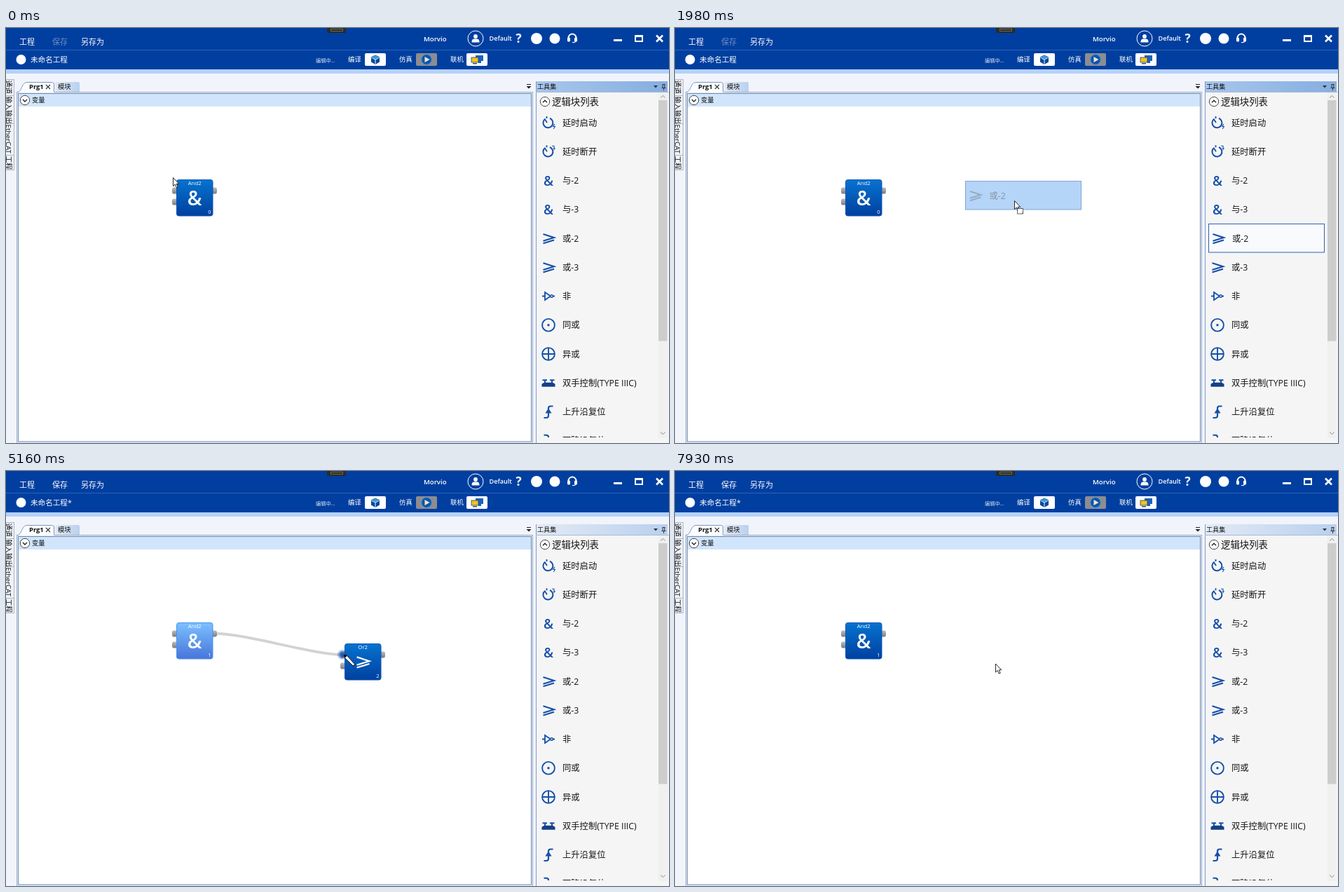
An HTML page that plays this animation: 946x592 px, repeating every 8000 ms.

```html
<!DOCTYPE html>
<html lang="zh-CN">
<head>
<meta charset="utf-8">
<title>逻辑编辑器</title>
<style>
html, body { margin: 0; width: 100%; height: 100%; overflow: hidden; background: #f1f4fa; }
svg { display: block; width: 946px; height: 592px; }
text { font-family: "Open Sans", "Noto Sans CJK SC", "Noto Sans CJK", sans-serif; white-space: pre; }
</style>
</head>
<body>
<svg id="stage" viewBox="0 0 946 592" xmlns="http://www.w3.org/2000/svg">
<defs>
  <linearGradient id="dark" x2="0" y2="1"><stop stop-color="#0673d0"/><stop offset="1" stop-color="#00409f"/></linearGradient>
  <linearGradient id="lit" x2="0" y2="1"><stop stop-color="#7cc0ff"/><stop offset="1" stop-color="#4775da"/></linearGradient>
  <linearGradient id="port" x2="0" y2="1"><stop stop-color="#b9bcc2"/><stop offset=".5" stop-color="#9a9da3"/><stop offset="1" stop-color="#777b83"/></linearGradient>
  <linearGradient id="active"><stop stop-color="#a8c6eb"/><stop offset="1" stop-color="#86aee0"/></linearGradient>
  <linearGradient id="idle"><stop stop-color="#e3eaf4"/><stop offset="1" stop-color="#b9d0ee"/></linearGradient>
  <radialGradient id="halo"><stop stop-color="#1450b4"/><stop offset=".5" stop-color="#1450b4" stop-opacity=".6"/><stop offset="1" stop-color="#1450b4" stop-opacity="0"/></radialGradient>
  <clipPath id="listClip"><rect x="757" y="92" width="174" height="492"/></clipPath>
</defs>
</svg>
<script>
const stage = document.getElementById('stage');
const BLUE = '#003fa0', INK = '#1650a8', LOOP = 8000;

const rect = (x, y, w, h, fill, more = '') =>
  `<rect x="${x}" y="${y}" width="${w}" height="${h}" fill="${fill}" ${more}/>`;
const disc = (x, y, r, fill, more = '') =>
  `<circle cx="${x}" cy="${y}" r="${r}" fill="${fill}" ${more}/>`;
const line = (d, color, w = 1, more = '') =>
  `<path d="${d}" fill="none" stroke="${color}" stroke-width="${w}" ${more}/>`;
const fill = (d, color, more = '') => `<path d="${d}" fill="${color}" ${more}/>`;
// y is the vertical middle of the text
const text = (x, y, size, str, color = '#fff', more = '') =>
  `<text x="${x}" y="${y + size * .37}" font-size="${size}" fill="${color}" ${more}>${str}</text>`;
const at = (x, y, body, more = '') => `<g transform="translate(${x} ${y})" ${more}>${body}</g>`;

const SEMI = 'font-weight="600"', BOLD = 'font-weight="700"';
const amp = (size, color) => text(0, 0, size, '&amp;', color, `text-anchor="middle" ${SEMI}`);
const orSign = (color, w, k = 1) =>
  line('M-7.5-6L8-1L-7.5 3.8M-7.5 7.2L8 2.4', color, w, `transform="scale(${k})"`);

function header() {
  return rect(0, 0, 946, 59, BLUE) + rect(0, 31, 946, 1, '#2a62b6') +
    rect(0, 59, 946, 6, '#b4d2fb') +
    rect(458, 0, 27, 7, '#2c2b25') + rect(463.5, 1.5, 17, 3, 'none', 'stroke="#6b6a62"') +
    text(19, 20, 11, '工程') + text(66, 20, 11, '保存', '#6e8cc0', 'id="save"') + text(107, 20, 11, '另存为') +
    text(596, 15, 9.6, 'Morvio', '#fff', SEMI) +
    disc(670, 15, 11, 'none', 'stroke="#fff"') + disc(670, 12, 2.9, '#fff') +
    fill('M664.5 20.5Q664.5 15.5 668 15.5H672Q675.5 15.5 675.5 20.5Z', '#fff') +
    text(689.5, 15, 9.1, 'Default', '#fff', SEMI) + text(727.5, 14.5, 17, '?', '#fff', BOLD) +
    disc(757, 15, 8, '#fff') + disc(783, 15, 7.5, '#fff') +
    line('M802.5 16V14A5.5 5.5 0 0 1 813.5 14V16', '#fff', 2) +
    rect(801, 13.5, 4, 6, '#fff', 'rx="1.5"') + rect(811, 13.5, 4, 6, '#fff', 'rx="1.5"') +
    line('M813 19Q812 21 808 20.5', '#fff', 1.2) +
    rect(867, 16, 12, 3, '#fff') +
    rect(898, 11, 10, 8, 'none', 'stroke="#fff" stroke-width="2"') + rect(897, 10, 12, 3, '#fff') +
    line('M928 10.5L937 19.5M937 10.5L928 19.5', '#fff', 2.6) +
    disc(21.5, 45, 7, '#fff') + text(35, 45, 10.6, '未命名工程', '#fff', 'id="title"') +
    text(442, 46, 7.2, '编辑中...', '#dfe8f6') +
    text(488, 45, 9.4, '编译') + rect(512, 36, 30, 18, '#fff', 'rx="2"') +
    fill('M527 38.5L533 41.5V48.5L527 52L521 48.5V41.5Z', '#0a479c') +
    line('M521.5 42L527 45L532.5 42M527 45V51.5', '#bfe0ff', 1.2) + fill('M527 39L531.5 41.5L527 44L522.5 41.5Z', '#3fa0d8') +
    text(561, 45, 9.4, '仿真') + rect(585, 36, 30, 18, '#8c8d90', 'rx="2"') +
    disc(600, 45, 7.2, '#0d55ae', 'stroke="#3a8ad8"') + fill('M597.5 41L604.5 45L597.5 49Z', '#f2e6c0') +
    text(634, 45, 9.4, '联机') + rect(657, 36, 30, 18, '#fff', 'rx="2"') +
    rect(670, 39, 11, 8, '#1b62bd') + rect(674, 47, 4, 3, '#1b62bd') +
    rect(664, 42, 10, 7, '#f2c21c', 'stroke="#19406f" stroke-width=".8"') + rect(666, 50, 6, 1.5, '#39557a');
}

function sideTabs() {
  const tab = ([str, y, end]) => rect(-1, y + .5, 12.5, end - y, '#eef2f8', 'stroke="#a9b6c8"') +
    `<text transform="translate(-.5 ${y + 1.5}) rotate(90)" font-size="9.8" fill="#111">${str}</text>`;
  return [['通道', 73, 96], ['输入输出', 96, 136], ['EtherCAT', 136, 181], ['工程', 181, 202]].map(tab).join('');
}

const ring = (x, y, d) => disc(x, y, 6.7, '#fff', 'stroke="#444"') + line(d, '#222', 1.4);

function editor() {
  return rect(15.5, 91.5, 736, 510, '#e3e9f2', 'stroke="#9dafc8"') +
    rect(17.5, 93.5, 732, 496.5, '#fff', 'stroke="#718cb3"') +
    rect(18, 94, 731, 18, '#d0e5fb') +
    fill('M70 91V79Q70 77 72 77H103Q105 77 105 79V91Z', 'url(#idle)') +
    text(74, 84, 9.3, '模块', '#111') +
    fill('M16 92C23 91 22 77.5 30 77.5H65.5Q68.5 77.5 68.5 80V92Z', '#fbfdff') +
    line('M16 91.5C23 91 22 77.5 30 77.5H65.5Q68.5 77.5 68.5 80V91', '#7c9ac4') +
    text(33, 84, 9.4, 'Prg1', '#111', BOLD) + line('M57 81L63 87M63 81L57 87', '#333', 1.1) +
    rect(743, 80, 6, 1, '#222') + fill('M742.5 83H749.5L746 86.5Z', '#222') +
    ring(27, 103, 'M24 102L27 105L30 102') + text(37, 103, 9.3, '变量', '#111');
}

const timer = mark =>
  line('M-4.5-5.5A7 7 0 1 0 2-6.2', INK, 2) + line('M-2 0L-5-4.5M-2.5-9V-6', INK, 1.8) + mark;

const tools = [
  ['延时启动', timer(line('M9 2L6.8 5.5H9.4L7.2 9', INK, 1.1))],
  ['延时断开', timer(line('M5-8H8V-2M7-4.5H10', INK, 1.1))],
  ['与-2', amp(19, INK)],
  ['与-3', amp(19, INK)],
  ['或-2', orSign(INK, 2.1)],
  ['或-3', orSign(INK, 2.1)],
  ['非', line('M-9 0H-5M-5-5.5V5.5L3 0ZM6.5 0H9', INK, 1.8) + disc(4.6, 0, 1.8, '#f5f5f6', `stroke="${INK}" stroke-width="1.4"`)],
  ['同或', disc(0, 0, 8.9, 'none', `stroke="${INK}" stroke-width="1.9"`) + disc(0, 0, 1.7, INK)],
  ['异或', disc(0, 0, 8.9, 'none', `stroke="${INK}" stroke-width="1.9"`) + line('M-9 0H9M0-9V9', INK, 1.9)],
  ['双手控制(TYPE IIIC)', fill('M-9.5 5.5V1.5L-6-.5H6L9.5 1.5V5.5Z', '#153f86') +
    line('M-8.5-4H-2M2-4H8.5M-5-4V0M5-4V0', INK, 2)],
  ['上升沿复位', line('M-6.5 8.5H-3Q0 8.5 0 5.5V-5Q0-8 3-8H6.5', INK, 2.2) + fill('M-4.6 2L0-5L4.6 2Z', INK)],
  ['下降沿复位', line('M-6.5-8H-3Q0-8 0-5V8H6', INK, 2.2)]
];

function panel() {
  const rows = tools.map(([name, icon], i) => {
    const y = 135 + i * 41.25;
    return `<g id="tool${i}">` + at(774, y, icon) + text(794, y, 12.3, name, '#151515') + '</g>';
  }).join('');
  return rect(756, 76, 190, 516, '#f5f5f6') + rect(756, 76, 188, 15, 'url(#active)', 'id="head"') +
    rect(756, 76, 1, 516, '#7f9dc8') + rect(756, 91, 190, 1, '#a4bbdb') +
    text(758, 84, 9.1, '工具集', '#111') + fill('M924 82H930L927 85.5Z', '#333') +
    line('M936.5 80.5H940.5M937 80.5V85M939.7 80.5V85M935.5 85.5H941.5M938.5 86V89', '#333') +
    rect(931, 92, 13, 493, '#f0f0f0') + rect(931, 103, 12.5, 343.5, '#cdcdcd') +
    line('M934 99.5L937.3 96.5L940.5 99.5M934 576.5L937.3 579.5L940.5 576.5', '#888', 1) +
    ring(769, 105, 'M766 106.3L769 103.3L772 106.3') + text(779, 105, 13.4, '逻辑块列表', '#151515') +
    `<g clip-path="url(#listClip)">` +
    rect(761.5, 279.5, 165, 40.5, '#f8fafd', 'id="pick" stroke="#2c62b0"') + rows + '</g>';
}

function block(id, name, sign) {
  const port = (x, y) => rect(x, y, 8, 9, 'url(#port)', 'rx="2.8"');
  return `<g id="${id}">` + port(-6, 11.5) + port(-6, 27.5) + port(50, 11.5) +
    rect(.5, .5, 51.5, 51.5, 'url(#dark)', 'rx="3" class="body"') +
    text(26.2, 4.8, 7.8, name, '#fff', 'text-anchor="middle"') + at(26.2, 26.3, sign) +
    text(49.5, 46, 7.6, '0', '#fff', 'text-anchor="end" class="num"') + '</g>';
}

const arrow = `<path d="M.5.5V12.6L3.2 10L5.2 14.6L7.2 13.7L5.2 9.3H8.8Z" fill="#fff" stroke="#111" stroke-width=".9"/>`;
const cursors = {
  arrow,
  drag: arrow + rect(4.5, 11.5, 8, 7.5, '#fff', 'stroke="#111" stroke-dasharray="1.6 .7"'),
  pen: fill('M0 0L4.8 1.6L15.6 13.6L13.2 16L1.6 4.8Z', '#fff', 'stroke="#111"') +
    fill('M0 0L4.8 1.6L1.6 4.8Z', '#111'),
  move: fill('M0-9.5L3.5-6H1V-1H6V-3.5L9.5 0L6 3.5V1H1V6H3.5L0 9.5L-3.5 6H-1V1H-6V3.5L-9.5 0L-6-3.5V-1H-1V-6H-3.5Z',
    '#fff', 'stroke="#111" stroke-width=".9"')
};

stage.insertAdjacentHTML('beforeend',
  rect(0, 65, 946, 527, '#f1f4fa') + header() + sideTabs() + editor() + panel() +
  line('', BLUE, 3.3, 'id="wire"') + block('and', 'And2', amp(28, '#fff')) +
  block('or', 'Or2', orSign('#fff', 1.9, 1.15)) +
  disc(0, 0, 8, 'url(#halo)', 'id="glow"') +
  '<g id="ghost" opacity=".8">' + rect(.5, .5, 165, 40.5, '#a3cbf7', 'stroke="#5f8fce"') +
  at(14.5, 21, orSign('#7d95b4', 2)) + text(34.5, 21, 12.3, '或-2', '#67788e') + '</g>' +
  '<g id="pointer">' + Object.keys(cursors).map(k => `<g id="c-${k}">${cursors[k]}</g>`).join('') + '</g>');

const $ = id => document.getElementById(id);
const show = (id, on) => $(id).setAttribute('display', on ? 'inline' : 'none');
const place = (id, x, y) => $(id).setAttribute('transform', `translate(${x} ${y})`);

// start, end, number of visible steps
const runs = [[390, 1160, 12], [1230, 1980, 12], [2250, 2990, 10], [3140, 3890, 11], [3960, 4300, 6],
  [5360, 5500, 3], [5700, 5850, 3], [5990, 6130, 3], [6400, 6450, 2]];

// time, x, y of the pointer
const track = [
  [320, 238, 213], [460, 262, 223], [600, 420, 265], [740, 640, 300], [880, 780, 312], [1000, 826, 313],
  [1160, 831, 307], [1230, 740, 285], [1298, 604, 265], [1366, 466, 251], [1434, 405, 243],
  [1503, 389, 240], [1640, 402, 241], [1800, 458, 244], [1911, 484, 246],
  [2180, 484, 246], [2414, 450, 243], [2579, 380, 231], [2743, 318, 221], [2990, 297, 231],
  [3070, 297, 232], [3215, 318, 236], [3365, 375, 250], [3515, 445, 266], [3665, 498, 277],
  [3740, 500, 274], [3890, 494, 272], [3960, 492, 270], [4096, 486, 266], [4300, 482, 262],
  [5290, 482, 262], [5500, 512, 276], [5630, 512, 276], [5850, 461, 308],
  [5920, 461, 308], [6130, 461, 275.5], [6350, 461, 275.5], [6450, 457, 274.5]
];

function stepTime(t) {
  let s = 0;
  for (const [a, b, n] of runs) {
    if (t < a) break;
    const d = (b - a) / (n - 1);
    s = a + d * Math.min(n - 1, Math.floor((t - a) / d + .1));
  }
  return s;
}

function pointerAt(t) {
  const i = track.findIndex(k => k[0] > t);
  if (i === 0) return track[0].slice(1);
  if (i < 0) return track[track.length - 1].slice(1);
  const [a, x, y] = track[i - 1], [b, u, v] = track[i], p = (t - a) / (b - a);
  return [x + (u - x) * p, y + (v - y) * p];
}

function setBlock(id, lit, num) {
  const body = $(id).querySelector('.body');
  body.setAttribute('fill', `url(#${lit ? 'lit' : 'dark'})`);
  body.setAttribute('stroke', lit ? '#4a92ea' : '#0a55b4');
  $(id).querySelector('.num').textContent = num;
}

function draw(t) {
  const s = stepTime(t), [x, y] = pointerAt(s), saved = t >= 5160, gone = t >= 7930;

  const shape = t < 1230 ? 'arrow' : t < 2250 ? 'drag' : t < 2990 ? 'arrow' :
    t < 5360 ? 'pen' : t >= 5700 && t < 6650 ? 'move' : 'arrow';
  for (const k in cursors) show('c-' + k, k === shape);
  place('pointer', x, y);

  const picked = t < 2250 && (t >= 1160 || x > 761 && y > 279);
  show('pick', picked);
  place('tool4', picked ? 1 : 0, 0);

  // the dragged row trails the pointer by one step
  const [gx, gy] = pointerAt(s - 68);
  show('ghost', t >= 1230 && t < 2250);
  place('ghost', Math.round(gx - 70), Math.round(gy - 28));

  const [ox, oy] = t < 5700 ? [483, 246] : [x - 29, y - 30];
  place('and', 243, 216);
  place('or', ox, oy);
  show('or', t >= 2250 && !gone);
  setBlock('and', t >= 3140 && t < 5700, saved ? 1 : 0);
  setBlock('or', t >= 5700, saved ? 2 : 0);

  const [ex, ey] = t < 4300 ? [x, y + 2 * (t < 3960)] : [ox - 3, oy + 16];
  const k = (ex - 300) * .23;
  show('wire', t >= 3140 && !gone);
  $('wire').setAttribute('d', `M300 232C${300 + k} 232 ${ex - k} ${ey} ${ex} ${ey}`);
  $('wire').setAttribute('stroke', saved ? '#d2d2d3' : BLUE);
  $('wire').setAttribute('stroke-width', saved ? 3.8 : 3.3);

  const onOut = t >= 2990 && t < 3140;
  show('glow', onOut || t >= 4096 && t < 5360);
  place('glow', onOut ? 299 : 480, onOut ? 232 : 262);

  $('head').setAttribute('fill', t < 3140 ? 'url(#active)' : 'url(#idle)');
  $('title').textContent = saved ? '未命名工程*' : '未命名工程';
  $('save').setAttribute('fill', saved ? '#fff' : '#6e8cc0');
}

const start = performance.now();
function tick() {
  draw((performance.now() - start) % LOOP);
  requestAnimationFrame(tick);
}
tick();
</script>
</body>
</html>
```
